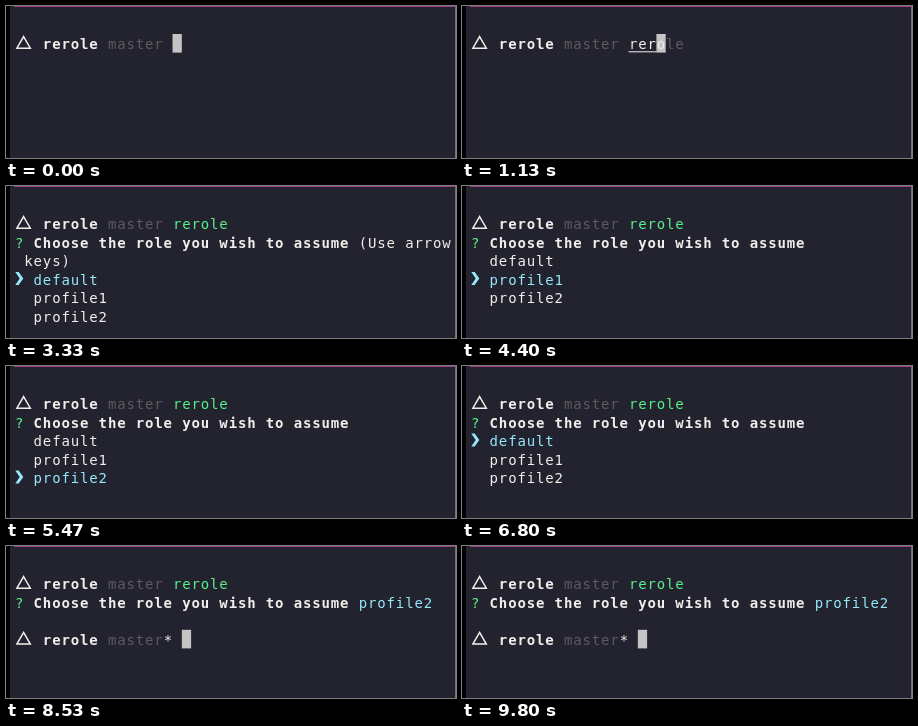
An HTML page for the animation above (9940 ms loop, 450 px wide and 152 px high).

```html
<!DOCTYPE html>
<html lang="en">
<head>
<meta charset="utf-8">
<title>Terminal role picker</title>
<style>
  html, body { margin: 0; width: 100%; height: 100%; overflow: hidden; background: #22232e; }
  svg { display: block; width: 450px; height: 152px; }
  text { font: 14px "DejaVu Sans Mono", "Noto Sans Mono", monospace; letter-spacing: 0.86px; fill: #eff0eb; }
  .bold { font-weight: 700; }
  .dim { fill: #5b5b60; }
  .green { fill: #5af08c; }
  .cyan { fill: #96e8fa; }
  .cursor { fill: #c4c4c5; }
  .delta { fill: none; stroke: #eff0eb; stroke-width: 1.5; }
</style>
</head>
<body>
<svg viewBox="0 0 450 152">
  <rect width="450" height="152" fill="#22232e"/>
  <rect width="4" height="152" fill="#000"/>
  <rect x="449" width="1" height="152" fill="#77707c"/>
  <rect x="8" width="442" height="1" fill="#9c3f80"/>
  <g id="screen"></g>
</svg>
<script>
const LOOP = 9940, CELL = 9.29, LINE = 18.6, LEFT = 8.6, TOP = 28;
const COMMAND = 'rerole';
const ROLES = ['default', 'profile1', 'profile2'];
const screen = document.getElementById('screen');

const colX = col => LEFT + col * CELL;
const rowY = row => TOP + row * LINE;

const run = (col, row, str, cls = '') =>
  `<text x="${colX(col) + 0.4}" y="${rowY(row) + 15}" class="${cls}">${str}</text>`;

const cursor = (col, row) =>
  `<rect class="cursor" x="${colX(col)}" y="${rowY(row)}" width="${CELL}" height="${LINE}"/>`;

const pointer = row =>
  `<path class="cyan" d="M9.3 ${rowY(row) + 2.2}h3.4l4.6 6.5-4.6 6.5h-3.4l4.4-6.5z"/>`;

const prompt = row =>
  `<path class="delta" d="M17.6 ${rowY(row) + 2.6}l6.7 11.6h-13.4z"/>` +
  run(3, row, COMMAND, 'bold') + run(10, row, 'master', 'dim');

// Command line with n letters typed and the rest suggested
function typing(n) {
  const done = n === COMMAND.length;
  let out = prompt(0) + cursor(17 + n, 0);
  if (n === 0) return out;
  out += run(17, 0, COMMAND.slice(0, n), done ? 'green' : '');
  if (done) return out;
  return out + run(17 + n, 0, COMMAND[n]) + run(18 + n, 0, COMMAND.slice(n + 1), 'dim') +
    `<rect x="${colX(17)}" y="45.3" width="${n * CELL}" height="1" fill="#eff0eb"/>`;
}

const entered = () => prompt(0) + run(17, 0, COMMAND, 'green');

const question = () => entered() + run(0, 1, '?', 'green') +
  run(2, 1, 'Choose the role you wish to assume', 'bold');

function menu(selected, hint) {
  const first = hint ? 3 : 2;
  let out = question() + pointer(first + selected);
  if (hint) out += run(37, 1, '(Use arrow') + run(1, 2, 'keys)');
  ROLES.forEach((role, i) => {
    out += run(2, first + i, role, i === selected ? 'cyan' : '');
  });
  return out;
}

const answered = () => question() + run(37, 1, ROLES[2], 'cyan');

const steps = [
  [0, () => typing(0)],
  [800, () => typing(1)],
  [930, () => typing(2)],
  [1130, () => typing(3)],
  [1270, () => typing(4)],
  [1400, () => typing(5)],
  [1530, () => typing(6)],
  [2400, () => entered() + cursor(0, 1)],
  [2600, () => menu(0, true)],
  [4130, () => menu(1)],
  [5130, () => menu(2)],
  [6070, () => menu(1)],
  [6200, () => menu(0)],
  [7070, () => menu(1)],
  [7200, () => menu(2)],
  [8130, answered],
  [8530, () => answered() + prompt(3) + run(16, 3, '*') + cursor(18, 3)]
];

let shown = null;
const start = performance.now();

function draw() {
  const t = (performance.now() - start) % LOOP;
  const step = steps.filter(([at]) => at <= t).pop();
  if (step !== shown) {
    shown = step;
    screen.innerHTML = step[1]();
  }
  requestAnimationFrame(draw);
}
draw();
</script>
</body>
</html>
```
